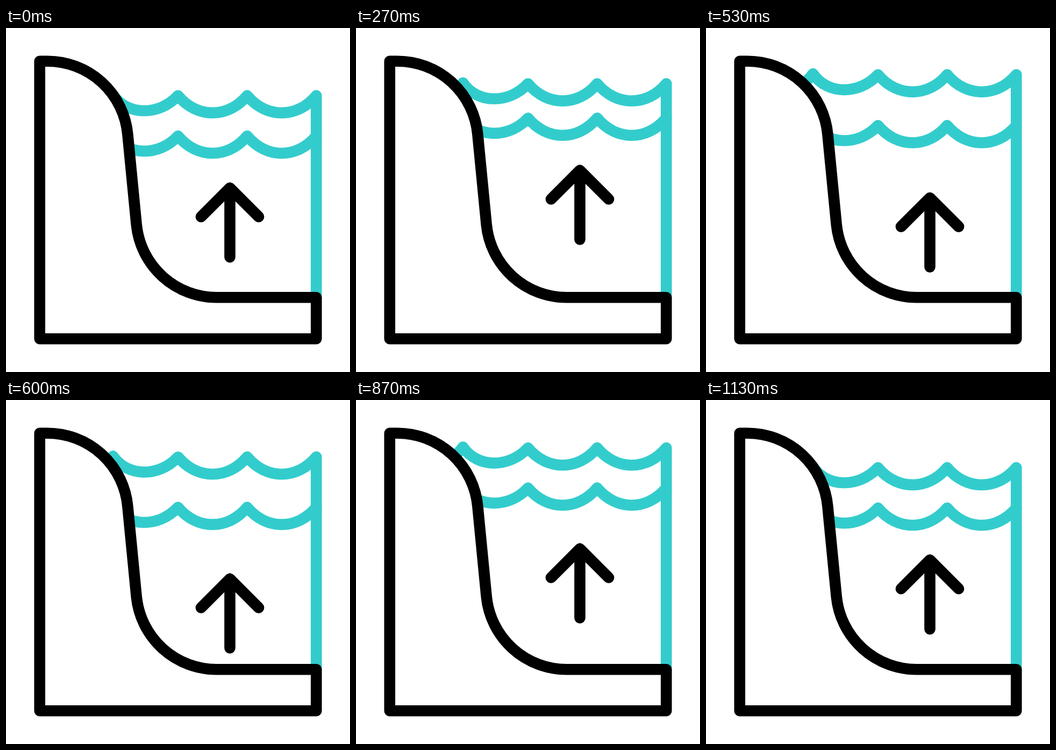
These frames come from a looping animation (640 by 640 pixels, 1.67 s). An HTML page:

```html
<!DOCTYPE html>
<html lang="en">
<head>
<meta charset="utf-8">
<title>Rising water level</title>
<style>
html, body { margin: 0; width: 100%; height: 100%; overflow: hidden; background: #fff; }
svg { display: block; width: 100vw; height: 100vh; }
path { fill: none; stroke: #000; stroke-width: 20.6; stroke-linecap: round; stroke-linejoin: round; }
.water { stroke: #3cc; }
#shore { fill: #fff; }
</style>
</head>
<body>
<svg viewBox="0 0 640 640">
  <path id="upper" class="water"/>
  <path id="lower" class="water"/>
  <path id="shore" d="M62.7 578.2V61.7H77A150 150 0 0 1 226.4 198L242.7 365.8A150 150 0 0 0 392 501.2H577.3V578.2Z"/>
  <path id="arrow" d="M416.5 426.2V297.6m-53.6 53.6l53.6 -53.6l53.6 53.6"/>
</svg>
<script>
const LOOP = 1670, FPS = 30, FLOOR = 501;
const [upper, lower, arrow] = ["upper", "lower", "arrow"].map(id => document.getElementById(id));

const swell = "c35.5 42.8 93 42.8 128.65 0";
const wave = y => `M70 ${y}c36 40 100 40 129 -1.6c27 39.5 86 39.5 121 1.6${swell.repeat(2)}`;

// Eased step from 0 to 1 between frames a and b
function step(frame, a, b) {
  const u = Math.min(1, Math.max(0, (frame - a) / (b - a)));
  return u * u * (3 - 2 * u);
}

// Leaves rest at a, reaches the given height at the peak, is back at b
const hump = (frame, a, peak, b, height) =>
  height * (step(frame, a, peak) - step(frame, peak, b));

const upperShift = f => hump(f, 4, 13.1, 21.4, -54.3) + hump(f, 21.4, 26.8, 34, -39);
const lowerShift = f => hump(f, 3, 12, 18.6, -57) + hump(f, 18.6, 25.4, 34, -37.8);
const arrowShift = f => hump(f, 3, 10.1, 18.7, -41.5) + hump(f, 10.1, 18.7, 27.4, 36.7)
  + hump(f, 18.7, 27.4, 34, -25);

const start = performance.now();

function draw() {
  const time = (performance.now() - start) % LOOP;
  const frame = Math.floor((time + 4) * FPS / 1000);
  upper.setAttribute("d", `${wave(125.8 + upperShift(frame))}V${FLOOR}`);
  lower.setAttribute("d", wave(200.9 + lowerShift(frame)));
  arrow.setAttribute("transform", `translate(0 ${arrowShift(frame)})`);
  requestAnimationFrame(draw);
}
draw();
</script>
</body>
</html>
```
